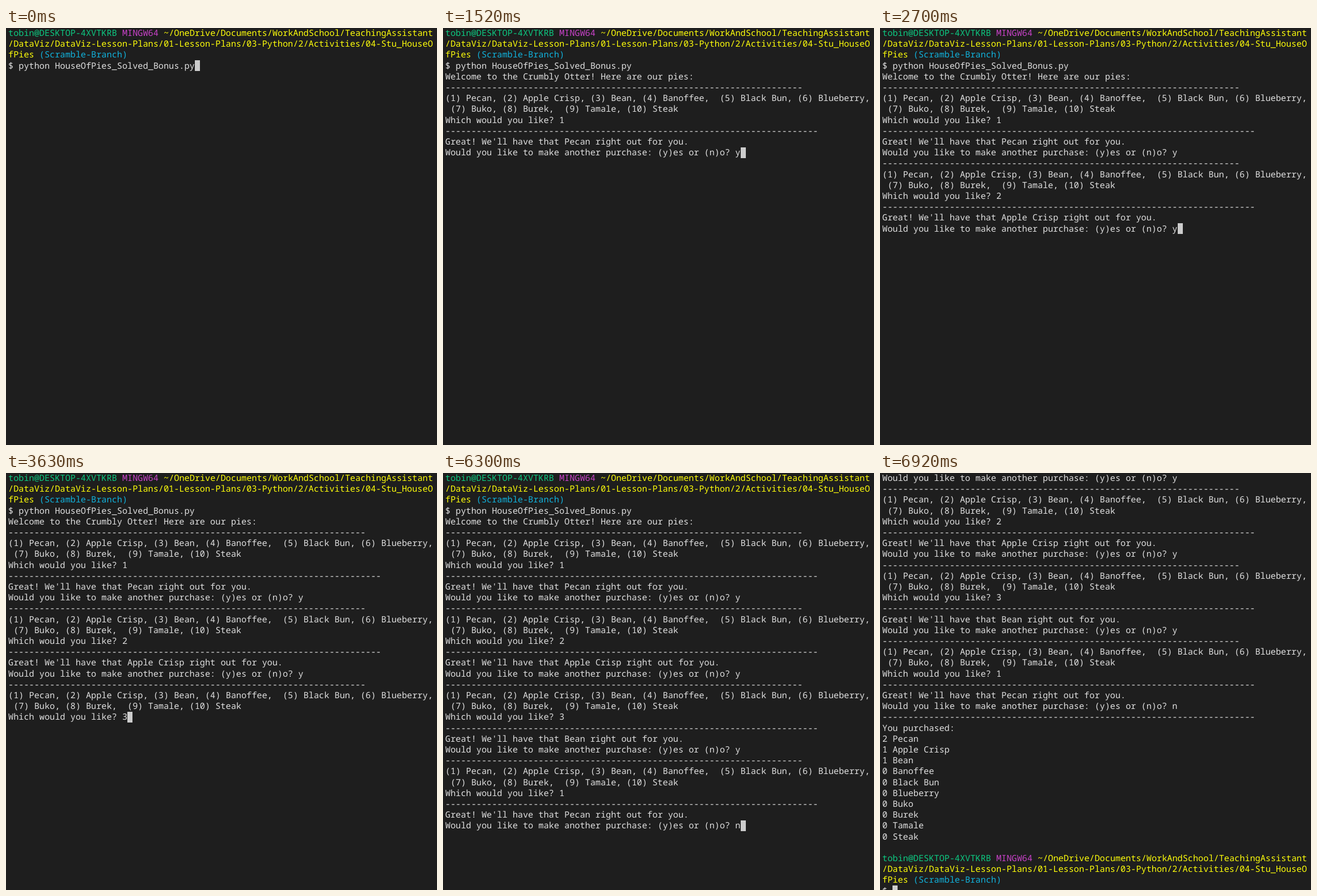
An HTML page that plays this animation: 760x737 px, repeating every 7.61 s.

```html
<!DOCTYPE html>
<html lang="en">
<head>
<meta charset="utf-8">
<title>Pie shop terminal</title>
<style>
  html, body { margin: 0; width: 100%; height: 100%; overflow: hidden; background: #1e1e1e; }
  svg { display: block; width: 760px; height: 737px; }
  text {
    font: 500 15.225px "Noto Sans Mono", "DejaVu Sans Mono", monospace;
    font-variant-ligatures: none;
    text-rendering: geometricPrecision;
    white-space: pre;
  }
</style>
</head>
<body>
<svg viewBox="0 0 760 737">
  <rect width="760" height="737" fill="#1e1e1e"/>
  <rect id="cursor" width="9" height="19" fill="#cccccc" shape-rendering="crispEdges"/>
  <g id="screen"></g>
</svg>
<script>
const LOOP = 7610;
const COLS = 82, ROWS = 39;
const CELL = 9.135, LINE = 19.2, LEFT = 4, BASE = 14;
const COLORS = { 0: '#e0e0e0', 32: '#0dc881', 33: '#ffff0a', 35: '#c842c8', 36: '#11b2dc' };

const paint = (code, text) => `\x1b[${code}m${text}\x1b[0m`;
const rule = n => '-'.repeat(n) + '\n';

const PIES = ['Pecan', 'Apple Crisp', 'Bean', 'Banoffee', 'Black Bun',
  'Blueberry', 'Buko', 'Burek', 'Tamale', 'Steak'];

const prompt = paint(32, 'tobin@DESKTOP-4XVTKRB') + ' ' + paint(35, 'MINGW64') + ' ' +
  paint(33, '~/OneDrive/Documents/WorkAndSchool/TeachingAssistant' +
    '/DataViz/DataViz-Lesson-Plans/01-Lesson-Plans/03-Python/2/Activities/04-Stu_HouseOfPies') +
  ' ' + paint(36, '(Scramble-Branch)') + '\n$ ';

const menu = rule(69) +
  '(1) Pecan, (2) Apple Crisp, (3) Bean, (4) Banoffee,  (5) Black Bun, (6) Blueberry,' +
  ' (7) Buko, (8) Burek,  (9) Tamale, (10) Steak\nWhich would you like? ';

const served = n => '\n' + rule(72) +
  `Great! We'll have that ${PIES[n - 1]} right out for you.\n` +
  'Would you like to make another purchase: (y)es or (n)o? ';

const orders = [1, 2, 3, 1];
const receipt = '\n' + rule(72) + 'You purchased:\n' +
  PIES.map((pie, i) => `${orders.filter(n => n === i + 1).length} ${pie}\n`).join('');

// Each event appends its text to the terminal at the given time.
const events = [
  [0, prompt + 'python HouseOfPies_Solved_Bonus.py'],
  [400, '\n'],
  [480, 'Welcome to the Crumbly Otter! Here are our pies:\n' + menu],
  [990, '1'], [1140, served(1)], [1520, 'y'], [1770, '\n' + menu],
  [2000, '2'], [2170, served(2)], [2700, 'y'], [3160, '\n' + menu],
  [3630, '3'], [3780, served(3)], [4160, 'y'], [4790, '\n' + menu],
  [5260, '1'], [5730, served(1)], [6300, 'n'],
  [6850, receipt],
  [6920, '\n' + prompt]
];

// Lays text out on the grid as rows of coloured runs.
function layout(text) {
  const rows = [[]];
  let col = 0, color = COLORS[0];
  const newLine = () => { rows.push([]); col = 0; };
  for (const [token, code] of text.matchAll(/\x1b\[(\d+)m|[^]/g)) {
    if (code) { color = COLORS[code]; continue; }
    if (token === '\n') { newLine(); continue; }
    if (col === COLS) newLine();
    const row = rows[rows.length - 1];
    let run = row[row.length - 1];
    if (!run || run.color !== color) row.push(run = { col, color, text: '' });
    run.text += token;
    col++;
  }
  return { rows: rows.slice(-ROWS), col };
}

const screen = document.getElementById('screen');
const cursor = document.getElementById('cursor');

function drawRun(run, y) {
  const node = document.createElementNS('http://www.w3.org/2000/svg', 'text');
  const skip = run.text.length - run.text.trimStart().length;
  node.setAttribute('x', LEFT + (run.col + skip) * CELL);
  node.setAttribute('y', y);
  node.setAttribute('fill', run.color);
  node.textContent = run.text.slice(skip);
  return node;
}

let shown = 0;
function render(time) {
  const count = events.filter(([at]) => at <= time).length;
  if (count === shown) return;
  shown = count;
  const { rows, col } = layout(events.slice(0, count).map(e => e[1]).join(''));
  screen.replaceChildren(...rows.flatMap((row, i) =>
    row.map(run => drawRun(run, i * LINE + BASE))));
  cursor.setAttribute('x', LEFT + col * CELL);
  cursor.setAttribute('y', (rows.length - 1) * LINE - 0.3);
}

const start = performance.now();
function tick() {
  render((performance.now() - start) % LOOP);
  requestAnimationFrame(tick);
}
tick();
</script>
</body>
</html>
```
